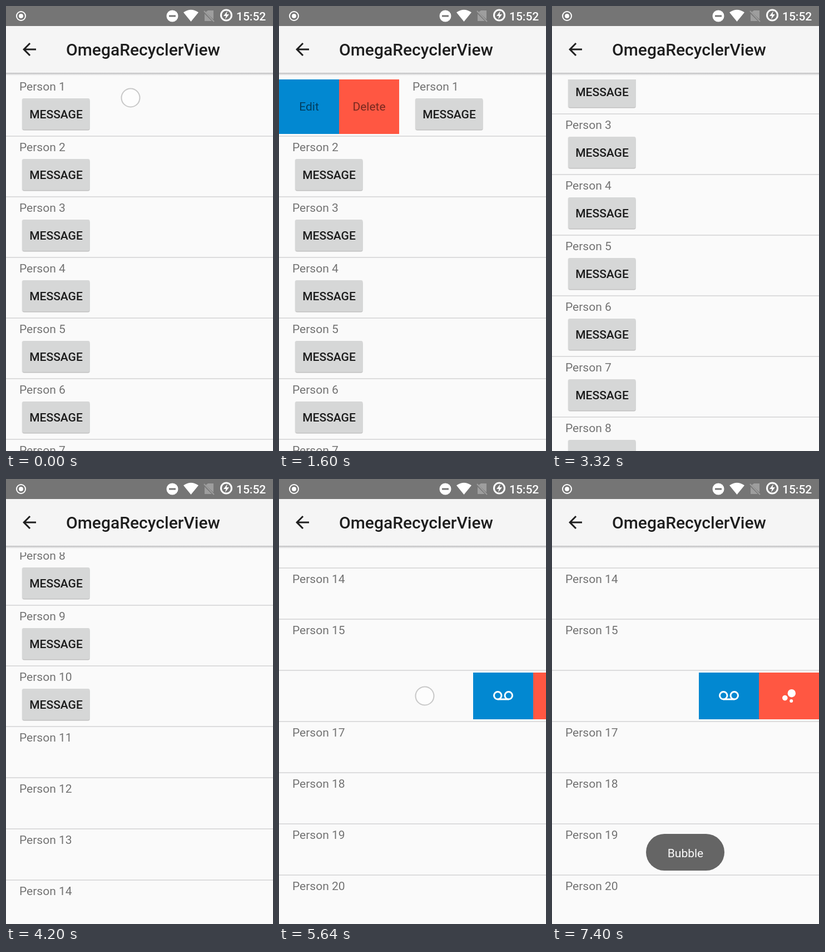
An HTML page that plays this animation: 480x800 px, repeating every 8000 ms.

```html
<!DOCTYPE html>
<html lang="en">
<head>
<meta charset="utf-8">
<title>Swipe menu list</title>
<style>
  html, body { margin: 0; width: 100%; height: 100%; overflow: hidden; background: #fafafa; }
  svg { display: block; width: 100%; height: 100%; }
  text { font-family: Roboto, Arial, sans-serif; font-size: 21px; }
  .name { fill: #737373; }
  .button { fill: #1c1c1c; font-weight: 500; text-anchor: middle; }
  .action { fill: #000; fill-opacity: .54; text-anchor: middle; }
  .title { fill: #1f1f1f; font-size: 30px; font-weight: 500; font-kerning: none; }
  .clock { fill: #fff; font-weight: 500; }
  .toast { fill: #fafafa; text-anchor: middle; }
</style>
</head>
<body>
<svg viewBox="0 0 480 800">
  <defs>
    <clipPath id="listArea"><rect y="132" width="480" height="668"/></clipPath>
    <linearGradient id="shadow" x2="0" y2="1">
      <stop stop-color="#bcbcbe"/>
      <stop offset="1" stop-color="#fafafa"/>
    </linearGradient>
  </defs>
  <rect width="480" height="800" fill="#fafafa"/>
  <g clip-path="url(#listArea)"><g id="list"></g></g>
  <path id="glow" d="M0 800Q240 762 480 800Z" fill="#757575"/>

  <rect y="36" width="480" height="84" fill="#f5f5f5"/>
  <rect y="120" width="480" height="5" fill="url(#shadow)"/>
  <path transform="translate(24 60) scale(1.5)" fill="#1f1f1f"
    d="M20 11H7.83l5.59-5.59L12 4l-8 8 8 8 1.41-1.41L7.83 13H20z"/>
  <text class="title" x="108" y="89">OmegaRecyclerView</text>

  <rect width="480" height="36" fill="#757575"/>
  <g fill="#fff">
    <circle cx="27" cy="18" r="8" fill="none" stroke="#fff" stroke-width="2"/>
    <circle cx="27" cy="18" r="4"/>
    <circle cx="299" cy="18" r="10.5"/>
    <rect x="293" y="16.5" width="12" height="3" fill="#757575"/>
    <path d="M332.500 28L319 11.500Q332.500 2 346 11.500Z"/>
    <path d="M363 8H373V24L359 11ZM357 14L370 27H357Z" fill="#9e9e9e"/>
    <path d="M356 9L374 28" stroke="#9e9e9e" stroke-width="2"/>
    <circle cx="396" cy="16.500" r="9.500" fill="none" stroke="#fff" stroke-width="3"/>
    <path d="M398 9L391 18H395.500L394 24L401 15H396.500Z"/>
  </g>
  <text class="clock" x="414" y="26">15:52</text>

  <g id="toast">
    <rect x="169" y="638" width="141" height="66" rx="33" fill="#656565"/>
    <text class="toast" x="240" y="680">Bubble</text>
  </g>
  <circle id="touch" r="16.5" fill="#fff" fill-opacity=".65" stroke="#888" stroke-opacity=".45" stroke-width="2"/>
</svg>
<script>
const LOOP = 8000, STEP = 40, ROWS = 20, TALL_ROWS = 10, MENU = 216, TOUCH_FADE = 200;
const BLUE = '#0288d1', RED = '#ff5742';
const $ = id => document.getElementById(id);
const clamp = (v, lo, hi) => Math.min(hi, Math.max(lo, v));
const ramp = (t, from, to) => clamp((t - from) / (to - from), 0, 1);
const easeOut = p => 1 - (1 - p) ** 3;

// Smooth monotone curve through [time, value] points.
function track(points) {
  const slopes = points.slice(1).map(([t, v], i) => (v - points[i][1]) / (t - points[i][0]));
  const tangents = points.map((_, i) => {
    const a = slopes[i - 1], b = slopes[i];
    return a * b > 0 ? 2 * a * b / (a + b) : 0;
  });
  return t => {
    if (t <= points[0][0]) return points[0][1];
    const i = points.findIndex(p => p[0] > t) - 1;
    if (i < 0) return points[points.length - 1][1];
    const [t0, v0] = points[i], [t1, v1] = points[i + 1];
    const d = t1 - t0, p = (t - t0) / d, q = 1 - p;
    return v0 * (1 + 2 * p) * q * q + v1 * (3 - 2 * p) * p * p
      + d * p * q * (tangents[i] * q - tangents[i + 1] * p);
  };
}

const scroll = track([[2800, 0], [2920, 45], [3080, 112], [3320, 149], [3480, 153],
  [3800, 153], [3960, 300], [4200, 770], [4400, 1085], [4590, 1331]]);
const openX = track([[0, 224], [840, 382], [1400, 455]]);
const openY = track([[0, 165], [840, 176], [1400, 168]]);
const closeX = track([[1800, 383], [2200, 180]]);
const leftX = track([[5400, 405], [5800, 185]]);
const fixed = v => () => v;

const touches = [
  { down: 0, up: 1400, x: openX, y: openY },
  { down: 1800, up: 2200, x: closeX, y: fixed(178) },
  { down: 2840, up: 3000, x: fixed(124), y: t => 758 - scroll(t) },
  { down: 3840, up: 3960, x: fixed(80), y: t => 842 - scroll(t) },
  { down: 5440, up: 5800, x: leftX, y: fixed(390) },
  { down: 6560, up: 6680, x: fixed(448), y: fixed(392) }
];

function firstRowOffset(t) {
  if (t < 1800) return clamp(openX(t) - 236, 0, MENU);
  const dragged = clamp(MENU - 371 + closeX(t), 0, MENU);
  return dragged * (1 - easeOut(ramp(t, 2200, 2400)));
}

function swipedRowOffset(t) {
  const dragged = clamp(leftX(t) - 393, -MENU, 0);
  return dragged + (-MENU - dragged) * easeOut(ramp(t, 5800, 6000));
}

const block = (x, height, color) => `<rect x="${x}" width="108" height="${height}" fill="${color}"/>`;
const leftMenu = `${block(-216, 101, BLUE)}${block(-108, 101, RED)}
  <text class="action" x="-162" y="59">Edit</text><text class="action" x="-54" y="59">Delete</text>`;
const rightMenu = `${block(480, 84, BLUE)}${block(588, 84, RED)}
  <g transform="translate(516 24) scale(1.5)" fill="none" stroke="#fff" stroke-width="2">
    <circle cx="5.500" cy="11.500" r="4.500"/><circle cx="18.500" cy="11.500" r="4.500"/><path d="M5.500 16H18.500"/>
  </g>
  <g transform="translate(624 24) scale(1.5)" fill="#fff">
    <circle cx="7.200" cy="14.400" r="3.200"/><circle cx="14.800" cy="18" r="2"/><circle cx="15.200" cy="8.800" r="4.800"/>
  </g>`;
const messageButton = `
  <rect x="28" y="37" width="123" height="58" rx="4" fill="#f0f0f0"/>
  <rect x="29.500" y="39" width="121" height="55.500" rx="3" fill="#c2c2c2"/>
  <rect x="29" y="37" width="121.500" height="56" rx="3" fill="#d6d7d7"/>
  <text class="button" x="90" y="73">MESSAGE</text>`;

function rowMarkup(n) {
  const tall = n <= TALL_ROWS;
  const top = 129 + 109 * Math.min(n - 1, TALL_ROWS) + 92 * Math.max(0, n - 1 - TALL_ROWS);
  const divider = n < ROWS ? `<rect y="${tall ? 104 : 87}" width="480" height="2" fill="#dcdcdd"/>` : '';
  return `<g transform="translate(0 ${top})">${divider}<g id="row${n}">
    <text class="name" x="24" y="23">Person ${n}</text>
    ${tall ? messageButton : ''}${n === 1 ? leftMenu : n === 16 ? rightMenu : ''}</g></g>`;
}

$('list').innerHTML = Array.from({ length: ROWS }, (_, i) => rowMarkup(i + 1)).join('');

const move = (id, x, y) => $(id).setAttribute('transform', `translate(${Math.round(x)} ${Math.round(y)})`);
const fade = (id, alpha) => $(id).setAttribute('opacity', alpha.toFixed(3));

function draw(t) {
  move('list', 0, -scroll(t));
  move('row1', firstRowOffset(t), 0);
  move('row16', swipedRowOffset(t), 0);
  fade('glow', .22 * ramp(t, 4620, 4740) * (1 - ramp(t, 4740, 5080)));
  fade('toast', easeOut(ramp(t, 6840, 7360)));
  const touch = touches.find(k => t >= k.down && t < k.up + TOUCH_FADE);
  fade('touch', touch ? 1 - ramp(t, touch.up, touch.up + TOUCH_FADE) : 0);
  if (touch) move('touch', touch.x(t), touch.y(t));
}

const began = performance.now();
function tick() {
  const t = (performance.now() - began) % LOOP;
  draw(Math.floor((t + 2) / STEP) * STEP);
  requestAnimationFrame(tick);
}
tick();
</script>
</body>
</html>
```
